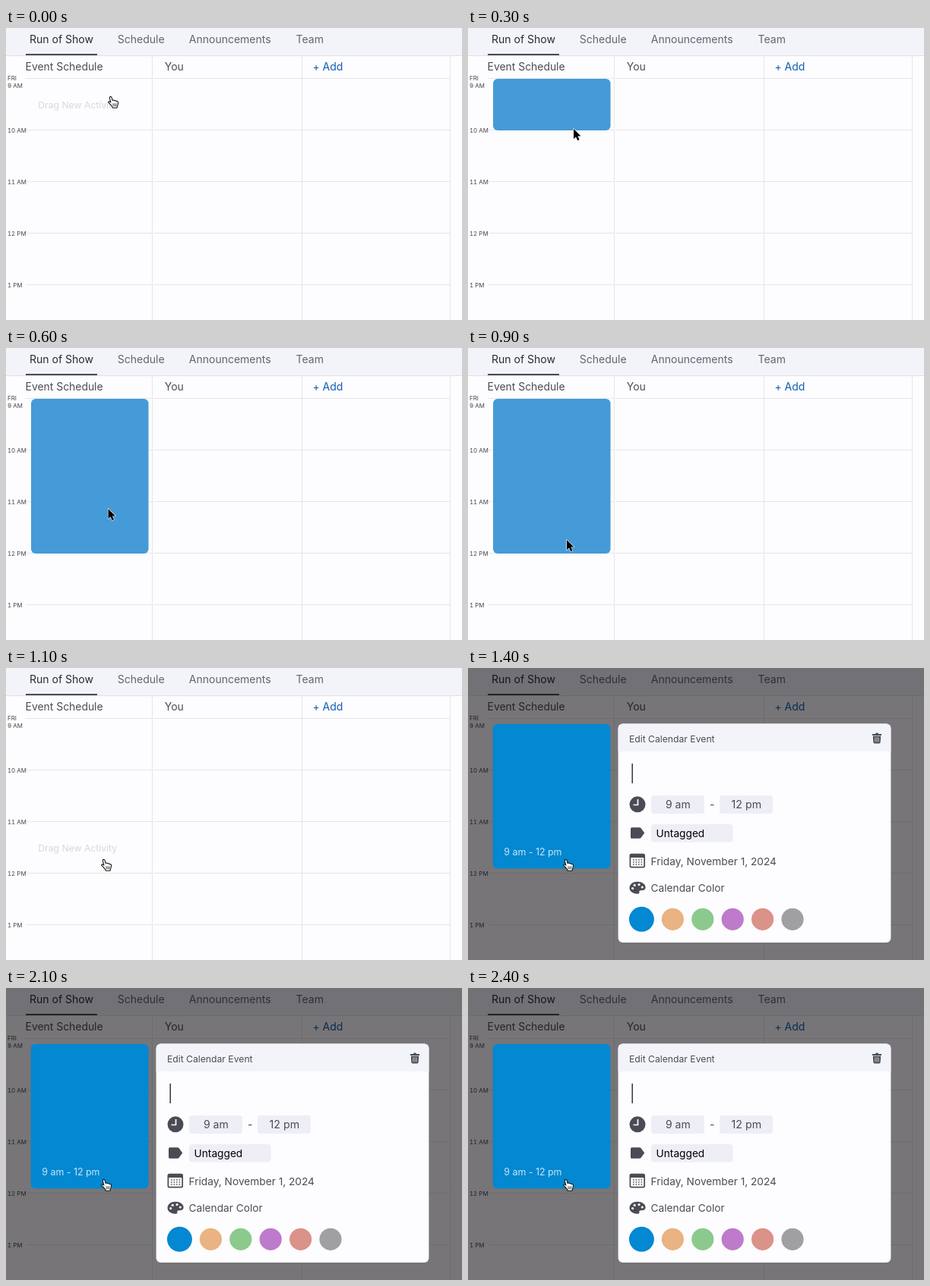
These frames come from a looping animation (600x385 px, 2500 ms). An HTML page:

```html
<!DOCTYPE html>
<html lang="en">
<head>
<meta charset="utf-8">
<title>Event schedule</title>
<style>
  html, body { margin: 0; width: 100%; height: 100%; overflow: hidden; background: #fdfcfe; }
  svg { display: block; width: 600px; height: 385px; }
  text { font-family: Inter, Roboto, "Liberation Sans", sans-serif; font-size: 14px; fill: #4b4d54; white-space: pre; }
  .tab { fill: #62656d; }
  .on { fill: #272a31; }
  .add { fill: #1160b0; }
  .hour { font-size: 7.9px; fill: #44464c; font-variant-numeric: tabular-nums; }
  .hint { font-size: 12.2px; fill: #d8d8dc; }
  .small { font-size: 12.2px; }
  .mid { font-size: 13.7px; }
  .grid { stroke: #e6e6eb; fill: none; }
  .chip { fill: #eeeef6; }
  .icon { fill: #494c54; }
  .cut { fill: #fdfcfe; }
</style>
</head>
<body>
<svg viewBox="0 0 600 385">
  <rect width="600" height="385" fill="#fdfcfe"/>
  <rect width="600" height="36" fill="#f3f4f9"/>
  <path d="M0 36.5H600" stroke="#dfe0e6"/>
  <rect x="26" y="34" width="94" height="2" fill="#494c56"/>
  <text class="on" x="31" y="20.3">Run of Show</text>
  <text class="tab" x="146.8" y="20.3">Schedule</text>
  <text class="tab" x="240.8" y="20.3">Announcements</text>
  <text class="tab" x="381.6" y="20.3">Team</text>
  <text x="25.6" y="56" style="font-size:13.9px">Event Schedule</text>
  <text x="208.8" y="56">You</text>
  <text class="add" x="403.4" y="56">+ Add</text>
  <path class="grid" d="M192.5 37V385M389.5 37V385M584.5 37V385"/>
  <g id="hours"><text class="hour" x="2" y="69.4">FRI</text></g>
  <text id="hint" class="hint" x="42.3">Drag New Activity</text>
  <rect id="draft" x="33" y="67" width="154.5" rx="6" fill="rgba(49,145,211,.9)"/>

  <g id="editor">
    <rect width="600" height="385" fill="rgba(3,0,3,.535)"/>
    <rect x="32.7" y="74" width="154.8" height="190.4" rx="6" fill="#0388d1"/>
    <text class="small" x="47.3" y="247.3" style="fill:#cbe4f4;font-size:12.4px">9 am - 12 pm</text>

    <rect x="197.6" y="73.6" width="358.8" height="288.4" rx="6" fill="#fdfcfe"/>
    <path d="M197.6 110V79.6a6 6 0 0 1 6-6H550.4a6 6 0 0 1 6 6V110Z" fill="#f3f4f9"/>
    <text class="small" x="211.9" y="97.5">Edit Calendar Event</text>
    <g class="icon">
      <path d="M532 87H536L536.8 85.5H539.2L540 87H544V88.9H532Z"/>
      <path d="M532.8 89.8H543.2L542.6 98Q542.5 99.4 541 99.4H535Q533.5 99.4 533.4 98Z"/>
    </g>
    <path d="M535.8 91.3V97.6M538 91.3V97.6M540.2 91.3V97.6" stroke="#f3f4f9" stroke-width=".8"/>
    <path d="M216.2 126V152" stroke="#25272c" stroke-width="1.4"/>

    <circle class="icon" cx="223" cy="179.8" r="10.5"/>
    <path d="M223.5 173V180.5H217.5" fill="none" stroke="#fdfcfe" stroke-width="1.7"/>
    <rect class="chip" x="241" y="168" width="70" height="24" rx="4"/>
    <rect class="chip" x="331" y="168" width="70" height="24" rx="4"/>
    <text x="276.3" y="185.2" text-anchor="middle">9 am</text>
    <text x="321.2" y="185" text-anchor="middle">-</text>
    <text x="366.3" y="185.2" text-anchor="middle" style="font-size:14.2px">12 pm</text>

    <path class="icon" d="M215.5 210.2H225.6Q226.8 210.2 227.5 211L232.2 217.5L227.5 224Q226.8 224.8 225.6 224.8H215.5Q214 224.8 214 223.3V211.7Q214 210.2 215.5 210.2Z"/>
    <rect class="chip" x="241" y="206" width="107.5" height="23.5" rx="4"/>
    <text class="mid" x="247.6" y="222.7" style="fill:#000">Untagged</text>

    <rect class="icon" x="212.5" y="244.8" width="20.5" height="18.7" rx="2.5"/>
    <rect class="cut" x="214.2" y="250" width="17.1" height="11.8" rx=".8"/>
    <path d="M217.1 253H230M217.1 256H230M217.1 259H230" stroke="#494c54" stroke-width="1.5" stroke-dasharray="1.5 2"/>
    <text class="mid" x="240.6" y="259.6">Friday, November 1, 2024</text>

    <path class="icon" d="M223 281.8C229 281.8 233.6 285 233.6 289.3C233.6 292.4 231 293.4 228 293.2C225.6 293 225 294 225.4 295.4C225.8 297 224.8 297.8 222.5 297.8C216.5 297.6 212.5 294 212.5 290C212.5 285.2 217 281.8 223 281.8Z"/>
    <g class="cut">
      <circle cx="216.6" cy="290.6" r="1.6"/><circle cx="219.2" cy="286.4" r="1.6"/>
      <circle cx="225" cy="285.6" r="1.6"/><circle cx="229.3" cy="289" r="1.6"/>
    </g>
    <text class="mid" x="240.6" y="295.4">Calendar Color</text>
    <g id="swatches"></g>
  </g>

  <path id="arrow" d="M0 0V13.2L3 10.4L5.2 15.3L7.6 14.2L5.4 9.5H9.5Z" fill="#000" stroke="#fff" stroke-width="1.2" stroke-linejoin="round" paint-order="stroke"/>
  <g id="hand" stroke="#111" stroke-linejoin="round" stroke-linecap="round">
    <g transform="translate(-.8 -.3) scale(.94)">
      <path d="M-2 1.6C-2.4-.2 .2-.9 .9 1L2.1 5.2C2.6 4.2 4.4 4.3 4.8 5.6C5.6 4.9 7 5.2 7.3 6.4C8.6 5.8 9.9 6.6 9.9 8.2C9.9 11 9.3 12 8.6 13.4L8.4 15.4H2L1.6 13.8C.2 12.4-1.4 9.6-3.2 8.6C-4.6 7.6-3.2 6-1.6 6.8L-.4 7.8Z" fill="#fff" stroke-width="1.15"/>
      <path d="M2.9 9.6L3.2 13M5.1 9.6V13M7.2 9.6L7 13" fill="none" stroke-width=".8"/>
    </g>
  </g>
</svg>
<script>
const LOOP = 2500, STEP = 100;
const PRESS = 100, RELEASE = 1100, EDIT = 1400;
const TOP = 67, HOUR = 68;
const $ = id => document.getElementById(id);

$('hours').innerHTML += ['9 AM', '10 AM', '11 AM', '12 PM', '1 PM'].map((label, i) => {
  const y = 66.5 + i * HOUR;
  return `<path class="grid" d="M${i ? 27 : 26} ${y}H192M194 ${y}H584"/>
    <text class="hour" x="2" y="${i ? y + 3 : 79}">${label}</text>`;
}).join('');

$('swatches').innerHTML = ['#0388d1', '#e9b383', '#8bca8c', '#be7acb', '#db9288', '#a09fa2']
  .map((color, i) => `<circle cx="${i ? 230 + 39.4 * i : 228.4}" cy="331.3" r="${i ? 14.6 : 16.5}" fill="${color}"/>`)
  .join('');

// Pointer position at each 100 ms step; it rests on the last one.
const path = [
  [139, 91], [139, 96], [139, 110], [139, 133], [138.7, 155.5], [137, 182],
  [134.5, 212], [132, 235], [130.5, 249], [130, 253]
];

const show = (id, on) => $(id).setAttribute('visibility', on ? 'visible' : 'hidden');

function draw(time) {
  const t = Math.floor(time % LOOP / STEP) * STEP;
  const [x, y] = path[Math.min(t / STEP, path.length - 1)];
  const dragging = t >= PRESS && t < RELEASE;
  const slot = Math.floor((y - TOP) / HOUR);

  show('draft', dragging);
  $('draft').setAttribute('height', (slot + 1) * HOUR);
  show('hint', !dragging && t < EDIT);
  $('hint').setAttribute('y', 105.5 + slot * HOUR);
  show('editor', t >= EDIT);
  show('arrow', dragging);
  show('hand', !dragging);
  for (const id of ['arrow', 'hand']) $(id).setAttribute('transform', `translate(${x} ${y})`);
}

const start = performance.now();
function tick() {
  draw(performance.now() - start);
  requestAnimationFrame(tick);
}
tick();
</script>
</body>
</html>
```
